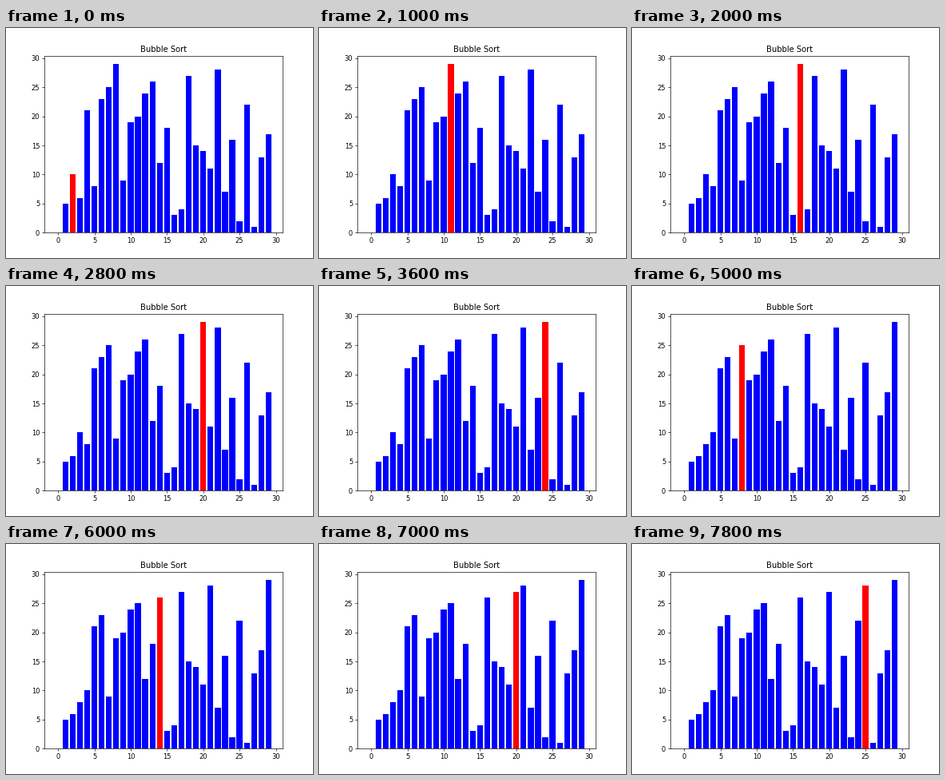
A matplotlib script for the animation above (8 s loop, 384 by 288 pixels).

```python
import matplotlib.pyplot as plt
from matplotlib.animation import FuncAnimation

# The unsorted input; every later state follows from the algorithm.
START = [0, 10, 5, 6, 21, 8, 23, 25, 29, 9, 19, 20, 24, 26, 12,
         18, 3, 4, 27, 15, 14, 11, 28, 7, 16, 2, 22, 1, 13, 17]
STEPS = 40
INTERVAL = 200


def bubble_sort(values):
    """Yield the list and the position of the moved value after each swap."""
    a = list(values)
    for end in range(len(a) - 1, 0, -1):
        for j in range(end):
            if a[j] > a[j + 1]:
                a[j], a[j + 1] = a[j + 1], a[j]
                yield list(a), j + 1


states = [state for state, _ in zip(bubble_sort(START), range(STEPS))]

fig, ax = plt.subplots(figsize=(6.4, 4.8), dpi=60)
ax.set_title("Bubble Sort")
bars = ax.bar(range(len(START)), START, color="blue")


def draw(step):
    values, moved = states[step]
    for i, (bar, value) in enumerate(zip(bars, values)):
        bar.set_height(value)
        bar.set_facecolor("red" if i == moved else "blue")
    return list(bars)


anim = FuncAnimation(fig, draw, frames=STEPS, interval=INTERVAL,
                     init_func=lambda: draw(0), repeat=True, repeat_delay=0)
plt.show()
```
